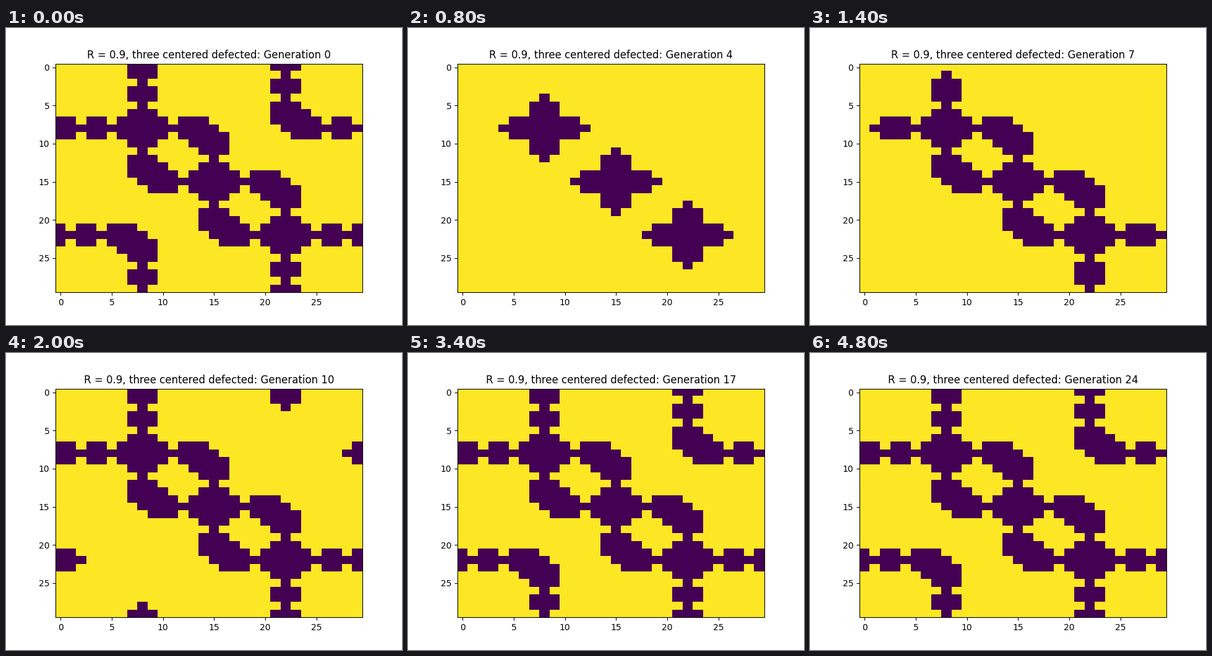
Recreate the animation shown at these times as a matplotlib script. Size 640x480 px, loop 5 s.

```python
import numpy as np
import matplotlib.pyplot as plt
from matplotlib.animation import FuncAnimation

SIZE = 30
FRAMES = 25
INTERVAL = 200
ROUNDS = 7
R, S, T, P = 0.9, 1.5, 0.0, 1.0  # years in prison per round
DEFECT, COOPERATE = 0, ROUNDS
STEPS = [(0, 0), (1, 0), (-1, 0), (0, 1), (0, -1)]


def shifted(grid):
    """The grid itself and its four periodic neighbours."""
    return np.stack([np.roll(grid, step, axis=(0, 1)) for step in STEPS])


def years(mine, theirs):
    """Sentence when each player cooperates until the first betrayal."""
    first = np.minimum(mine, theirs)
    betrayal = np.where(mine < theirs, T, np.where(mine > theirs, S, P))
    after = np.maximum(ROUNDS - first - 1, 0) * P
    return first * R + np.where(first < ROUNDS, betrayal + after, 0)


def evolve(grid):
    """Every player copies the best strategy in its neighbourhood."""
    strategies = shifted(grid)
    total = sum(years(grid, other) for other in strategies[1:])
    best = shifted(np.round(total, 6)).argmin(axis=0)
    return np.take_along_axis(strategies, best[None], axis=0)[0]


start = np.full((SIZE, SIZE), COOPERATE)
for center in (8, 15, 22):
    start[center, center] = DEFECT

history = [start]
for _ in range(FRAMES - 1):
    history.append(evolve(history[-1]))
history[0] = history[-1]  # the loop opens on the settled lattice

fig, ax = plt.subplots(figsize=(6.4, 4.8), dpi=100)
image = ax.imshow(history[0], cmap="viridis", vmin=DEFECT, vmax=COOPERATE,
                  aspect="auto", interpolation="nearest")
title = ax.set_title("")


def update(generation):
    image.set_data(history[generation])
    title.set_text(f"R = {R}, three centered defected: Generation {generation}")
    return image, title


animation = FuncAnimation(fig, update, frames=FRAMES, interval=INTERVAL,
                          repeat=True, repeat_delay=0)
plt.show()
```
